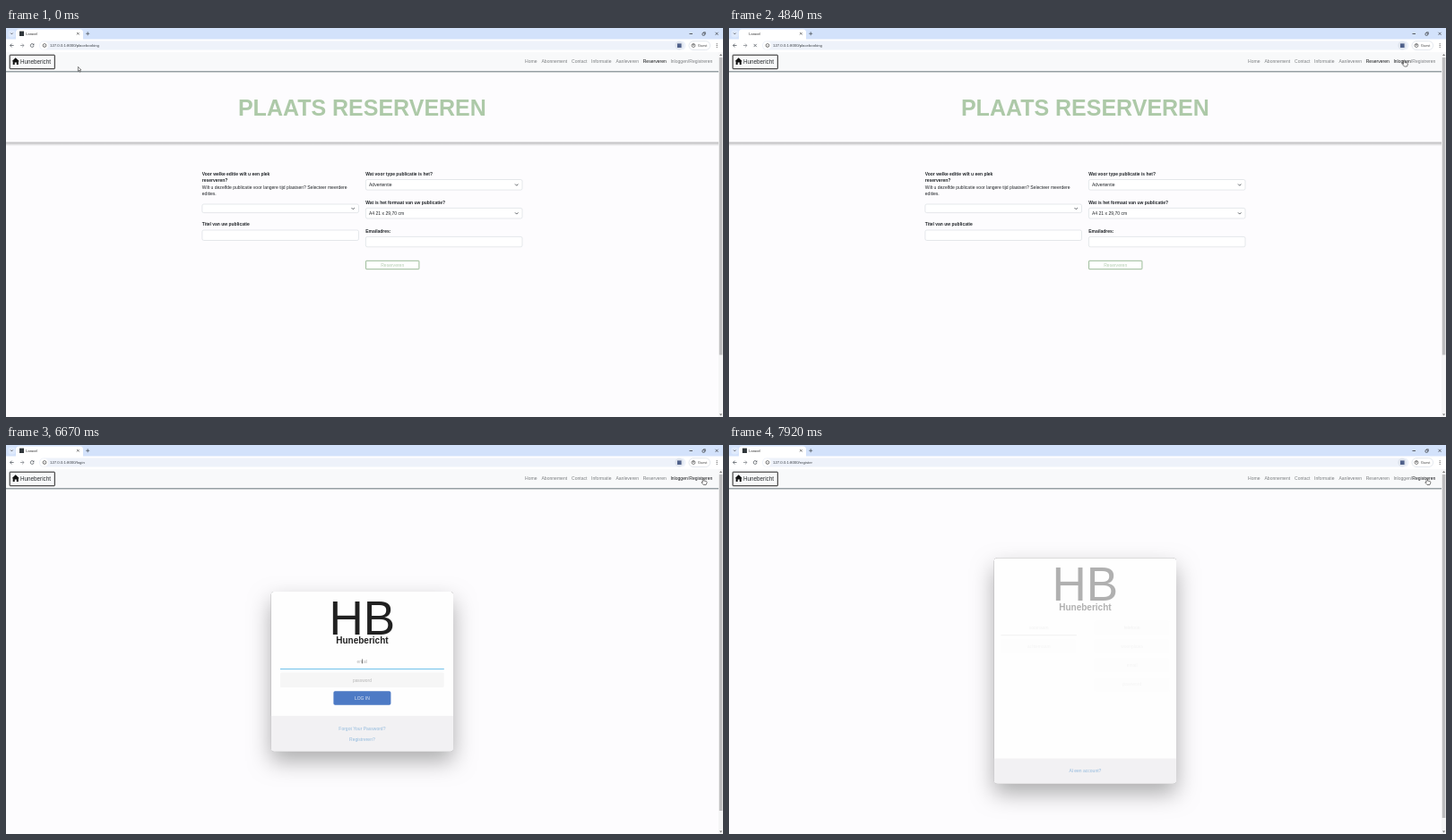
Write an HTML page with a canvas that moves like this. It is 800x435 px and loops after 8000 ms.

```html
<!DOCTYPE html>
<html lang="nl">
<head>
<meta charset="utf-8">
<title>Laravel</title>
<style>
html, body { margin: 0; width: 100%; height: 100%; overflow: hidden; background: #fdfcfe; }
canvas { display: block; width: 800px; height: 435px; }
</style>
</head>
<body>
<canvas id="stage"></canvas>
<script>
const W = 800, H = 435, LOOP = 8000;
const LOGIN_AT = 4868, REGISTER_AT = 6985;
const BRAND = 'Hunebericht', INITIALS = 'HB';
const SANS = '"Liberation Sans", Arial, sans-serif';
const canvas = document.getElementById('stage');
const ctx = canvas.getContext('2d');
const dpr = window.devicePixelRatio || 1;
canvas.width = W * dpr;
canvas.height = H * dpr;

function bezier(x1, y1, x2, y2) {
  const at = (a, b, s) => 3 * (1 - s) * (1 - s) * s * a + 3 * (1 - s) * s * s * b + s * s * s;
  return x => {
    if (x <= 0) return 0;
    if (x >= 1) return 1;
    let lo = 0, hi = 1;
    for (let i = 0; i < 24; i++) {
      const mid = (lo + hi) / 2;
      if (at(x1, x2, mid) < x) lo = mid; else hi = mid;
    }
    return at(y1, y2, lo);
  };
}
const ease = bezier(.25, .1, .25, 1);
const easeIn = bezier(.42, 0, 1, 1);

function rect(x, y, w, h, fill) {
  ctx.fillStyle = fill;
  ctx.fillRect(x, y, w, h);
}
function box(x, y, w, h, r, fill, stroke, lw = .6) {
  ctx.beginPath();
  ctx.roundRect(x, y, w, h, r);
  if (fill) { ctx.fillStyle = fill; ctx.fill(); }
  if (stroke) { ctx.strokeStyle = stroke; ctx.lineWidth = lw; ctx.stroke(); }
}
function line(pts, color, lw = .7) {
  ctx.beginPath();
  for (let i = 0; i < pts.length; i += 2) ctx.lineTo(pts[i], pts[i + 1]);
  ctx.strokeStyle = color;
  ctx.lineWidth = lw;
  ctx.stroke();
}
function shape(pts, fill, stroke, lw = .6) {
  ctx.beginPath();
  for (let i = 0; i < pts.length; i += 2) ctx.lineTo(pts[i], pts[i + 1]);
  ctx.closePath();
  if (fill) { ctx.fillStyle = fill; ctx.fill(); }
  if (stroke) { ctx.strokeStyle = stroke; ctx.lineWidth = lw; ctx.stroke(); }
}
function text(s, x, y, size = 5.04, color = '#212529', weight = 400, align = 'left') {
  ctx.font = `${weight} ${size}px ${SANS}`;
  ctx.fillStyle = color;
  ctx.textAlign = align;
  ctx.fillText(s, x, y);
}
function ring(x, y, r, color, from = 0, to = 7) {
  ctx.beginPath();
  ctx.arc(x, y, r, from, Math.min(to, from + 2 * Math.PI));
  ctx.strokeStyle = color;
  ctx.lineWidth = .7;
  ctx.stroke();
}

// Pointer path: time, x, y
const PATH = [
  [0, 80, 43], [1260, 80, 43], [2000, 191, 245], [2090, 191, 245], [2250, 199, 255],
  [3170, 199, 255], [3560, 797, 70], [3670, 804, -9], [3840, 804, -9], [4420, 752.5, 36],
  [4840, 752.5, 36], [5500, 750.5, 36], [6090, 755, 37], [6440, 755, 37], [6700, 778, 37.5]
];
function pointer(t) {
  const i = PATH.findIndex(p => p[0] > t);
  if (i < 0) { const p = PATH[PATH.length - 1]; return { x: p[1], y: p[2] }; }
  const a = PATH[i - 1], b = PATH[i];
  let k = (t - a[0]) / (b[0] - a[0]);
  k = k * k * (3 - 2 * k);
  return { x: a[1] + (b[1] - a[1]) * k, y: a[2] + (b[2] - a[2]) * k };
}
function drawPointer(p, hand) {
  ctx.save();
  ctx.translate(p.x, p.y);
  if (hand) {
    shape([0, .5, .9, 0, 1.5, .6, 1.5, 2.6, 4, 3, 4.9, 3.8, 4.6, 5.5, 3.9, 7, 1, 7,
      -1.2, 4.6, -.8, 3.8, .1, 4.3], '#fff', '#222', .6);
  } else {
    shape([.4, .4, .4, 5.3, 1.5, 4.3, 2.4, 6.2, 3.2, 5.8, 2.4, 4, 3.9, 4], '#fff', '#222', .55);
  }
  ctx.restore();
}

function drawBrowser(path, loading) {
  const ink = '#444b52';
  rect(0, 0, W, 13, '#d3e2fb');
  rect(0, 12.5, W, 14.5, '#fff');
  box(11, 1.5, 75, 12, [3.5, 3.5, 0, 0], '#fff');
  box(2.5, 2.5, 8, 8, 3, '#dfeafc');
  line([5.2, 5.6, 6.4, 6.9, 7.6, 5.6], '#333');
  if (!loading) rect(15, 3.6, 5, 5.4, '#30363a');
  text('Laravel', 22.3, 7.9, 3.9, '#333');
  line([79, 5, 81.6, 7.6], '#333', .6);
  line([81.6, 5, 79, 7.6], '#333', .6);
  line([89.2, 6.3, 93.2, 6.3], ink);
  line([91.2, 4.3, 91.2, 8.3], ink);
  line([762.5, 6.5, 766, 6.5], '#222');
  box(777, 5.6, 2.6, 2.6, .4, null, '#222', .6);
  line([778, 4.7, 780.4, 4.7, 780.4, 7.2], '#222', .5);
  line([791.5, 4.8, 794.6, 7.9], '#222', .6);
  line([794.6, 4.8, 791.5, 7.9], '#222', .6);

  line([8.6, 19.5, 4.6, 19.5], ink);
  line([6.5, 17.6, 4.6, 19.5, 6.5, 21.4], ink);
  line([16, 19.5, 20, 19.5], '#777d83');
  line([18.1, 17.6, 20, 19.5, 18.1, 21.4], '#777d83');
  if (loading) {
    line([27.6, 17.9, 30.8, 21.1], ink);
    line([30.8, 17.9, 27.6, 21.1], ink);
  } else {
    ring(29.2, 19.5, 1.9, ink, .2, 5.6);
    shape([31.3, 17.2, 31.3, 19.2, 29.4, 19.2], ink);
  }
  box(37, 14.6, 721.5, 10, 5, '#eef2fa');
  box(38, 15.3, 9, 8.6, 4.3, '#fff');
  ring(43, 19.5, 1.9, '#444', 0, 7);
  line([43, 19.2, 43, 20.6], '#444', .5);
  text('127.0.0.1:8000/' + path, 49, 21.2, 4.29, '#3a3f45');
  box(746.3, 14.8, 9.6, 9.6, 4.8, '#e0e5ee');
  rect(749, 17.4, 4.6, 4.6, '#50618a');
  box(762, 14.7, 23.6, 9.8, 4.9, '#fff', '#d2d8e2', .6);
  ring(767, 19.5, 2, '#555');
  ring(767, 18.9, .6, '#555');
  text('Guest', 772, 21, 3.85, '#444');
  for (let i = -1; i < 2; i++) rect(792.7, 19.1 + i * 1.8, .9, .9, '#333');
}

const LINKS = [
  ['Home', 579], ['Abonnement', 597.5], ['Contact', 631], ['Informatie', 653],
  ['Aanleveren', 680.4], ['Reserveren', 710.7], ['Inloggen', 741.4], ['Registreren', 762.3]
];
const isOver = (p, x, w) => p.x >= x && p.x <= x + w && p.y > 31 && p.y < 44;

function drawNav(active, p, dx) {
  rect(0, 27, W, 22, '#f8f9fa');
  rect(0, 48.4, W, .9, '#56666a');
  box(4.2, 30.2, 50.1, 15.5, .4, null, '#222', 1);
  shape([10.7, 33.2, 14.9, 37.3, 13.8, 37.3, 13.8, 41, 11.8, 41, 11.8, 38.4, 9.7, 38.4,
    9.7, 41, 7.7, 41, 7.7, 37.3, 6.6, 37.3], '#111');
  text(BRAND, 16, 39.7, 6.3, '#26292c');
  let hovering = isOver(p, 4, 50);
  for (const [label, x] of LINKS) {
    ctx.font = `5.06px ${SANS}`;
    const over = isOver(p, x + dx, ctx.measureText(label).width);
    hovering = hovering || over;
    text(label, x + dx, 39.4, 5.06, label === active || over ? '#16181a' : '#7b7e80');
  }
  text('/', 760.8 + dx, 39.4, 5.06, '#7b7e80');
  return hovering;
}

function drawScrollbar(end, p) {
  rect(795, 27, 5, 408, '#f5f5f6');
  rect(795.8, 33, 3.6, end - 33, p.x > 794.5 && p.y > 27 ? '#8c8c8c' : '#bcbcbe');
  shape([796, 31, 797.6, 29, 799.2, 31], '#777');
  shape([796, 431.5, 797.6, 433.5, 799.2, 431.5], '#777');
}

function field(x, y, h, value, isSelect) {
  box(x, y, 174.6, h, 1.8, '#fff', '#d4d8dd');
  if (value) text(value, x + 3.6, y + h / 2 + 1.8);
  if (isSelect) line([x + 166.6, y + h / 2 - .8, x + 168.3, y + h / 2 + .9, x + 170, y + h / 2 - .8], '#343a40', .8);
}
function drawBooking() {
  const bold = (s, x, y) => text(s, x, y, 4.98, '#212529', 700);
  const g = ctx.createLinearGradient(0, 126.5, 0, 132);
  g.addColorStop(0, 'rgba(0,0,0,0)');
  g.addColorStop(.35, 'rgba(0,0,0,.22)');
  g.addColorStop(1, 'rgba(0,0,0,0)');
  rect(0, 126.5, 795, 5.5, g);
  text('PLAATS RESERVEREN', 397.4, 98, 25, '#adc9a8', 700, 'center');

  bold('Voor welke editie wilt u een plek', 218.8, 164.7);
  bold('reserveren?', 218.8, 172.2);
  text('Wilt u dezelfde publicatie voor langere tijd plaatsen? Selecteer meerdere', 218.8, 179.7);
  text('edities.', 218.8, 187.2);
  field(218.9, 197, 9.6, '', true);
  bold('Titel van uw publicatie', 218.8, 221.2);
  field(218.9, 226, 11.5);

  bold('Wat voor type publicatie is het?', 401.3, 164.7);
  field(401.4, 169.5, 11.6, 'Advertentie', true);
  bold('Wat is het formaat van uw publicatie?', 401.3, 196.7);
  field(401.4, 201.4, 11.6, 'A4 21 x 29,70 cm', true);
  bold('Emailadres:', 401.3, 228.6);
  field(401.4, 233.4, 11.4);
  box(401.6, 260.3, 59.3, 9.4, .5, '#fff', '#8fb48c', .9);
  text('Reserveren', 431.2, 266.9, 5.04, '#b4ceb1', 400, 'center');
}

// Card in its own coordinates: horizontal centre 0, top 0
function drawCard(t, cx, top, h, footer, shift, body) {
  const alpha = ease(t);
  const layer = (delay, draw) => {
    ctx.globalAlpha = alpha * easeIn(t - delay);
    if (ctx.globalAlpha > 0) draw();
    ctx.globalAlpha = alpha;
  };
  ctx.save();
  ctx.beginPath();
  ctx.rect(0, 27, W, H - 27);
  ctx.clip();
  ctx.translate(cx, top - shift);
  ctx.globalAlpha = alpha;

  ctx.save();
  ctx.beginPath();
  ctx.rect(-W, -H, 2 * W, 3 * H);
  ctx.roundRect(-101.6, 0, 203.2, h, 3.5);
  ctx.clip('evenodd');
  ctx.shadowColor = 'rgba(0,0,0,.32)';
  ctx.shadowBlur = 24 * dpr;
  ctx.shadowOffsetY = 11 * dpr;
  box(-101.6, 0, 203.2, h, 3.5, '#000');
  ctx.restore();

  box(-101.6, 0, 203.2, h, 3.5, '#fefefe');
  box(-101.6, h - footer, 203.2, footer, [0, 0, 3.5, 3.5], '#f2f1f3');
  layer(.4, () => {
    text(INITIALS, 0, 48, 53, '#212121', 400, 'center');
    text(BRAND, 0, 58.3, 10, '#212121', 700, 'center');
  });
  body(layer);
  ctx.restore();
}
function cardInput(x, y, w, h, label, focused) {
  if (focused) rect(x, y + h - .8, w, .9, focused);
  else box(x, y, w, h, 1.5, '#f6f6f6');
  text(label, x + w / 2, y + h / 2 + 1.7, 4.9, '#b4b4b4', 400, 'center');
}
const cardLink = (s, y) => text(s, 0, y, 5, '#92badd', 400, 'center');

function drawLogin(t, cx, shift) {
  drawCard(t, cx, 164, 178.6, 39.8, shift, layer => {
    layer(.6, () => {
      cardInput(-91.4, 70, 182.8, 16.8, 'email', '#5fbae9');
      rect(-.2, 75.4, .6, 5, '#333');
    });
    layer(.8, () => cardInput(-91.4, 90.5, 182.8, 16.6, 'password'));
    layer(.9, () => {
      box(-32, 111.3, 64, 15.4, 1.8, '#2c62bb');
      text('LOG IN', 0, 120.8, 5, '#fff', 400, 'center');
    });
    cardLink('Forgot Your Password?', 154.8);
    cardLink('Registreren?', 166.8);
  });
}
function drawRegister(t, cx, shift) {
  drawCard(t, cx, 127.4, 252, 28, shift, layer => {
    layer(.6, () => {
      cardInput(-94, 70, 84.5, 16.6, 'voornaam', '#aaa');
      cardInput(10, 70, 84.5, 15.6, 'telefoon');
    });
    layer(.65, () => {
      cardInput(-94, 91, 84.5, 15.6, 'achternaam');
      cardInput(10, 91, 84.5, 15.6, 'woonplaats');
      cardInput(10, 112, 84.5, 15.6, 'email');
      cardInput(10, 133.5, 84.5, 15.6, 'password');
    });
    cardLink('Al een account?', 239.9);
  });
}

function render(t) {
  ctx.setTransform(dpr, 0, 0, dpr, 0, 0);
  rect(0, 0, W, H, '#fdfcfe');
  const p = pointer(t);
  const onLogin = t >= LOGIN_AT && t < REGISTER_AT;
  const onRegister = t >= REGISTER_AT;
  const age = (t - (onRegister ? REGISTER_AT : LOGIN_AT)) / 1000;
  const shift = (1 - ease(age)) * 406;
  const carded = onLogin || onRegister;
  const bar = !carded || shift < 20;   // the page only overflows once the card is nearly down
  const dx = bar ? 0 : 5.4;
  const loading = (t >= 4820 && t < LOGIN_AT) || (t >= 6860 && t < REGISTER_AT);

  const hand = drawNav(onRegister ? 'Registreren' : onLogin ? 'Inloggen' : 'Reserveren', p, dx);
  if (onRegister) drawRegister(age, bar ? 397.4 : 400, shift);
  else if (onLogin) drawLogin(age, bar ? 397.4 : 400, shift);
  else drawBooking();
  if (bar) drawScrollbar(onRegister ? 417 : onLogin ? 409 : 365.5, p);
  drawBrowser(onRegister ? 'register' : onLogin ? 'login' : 'placebooking', loading);
  drawPointer(p, hand);
}

const start = performance.now();
function tick(now) {
  render(Math.max(0, now - start) % LOOP);
  requestAnimationFrame(tick);
}
render(0);
requestAnimationFrame(tick);
</script>
</body>
</html>
```
